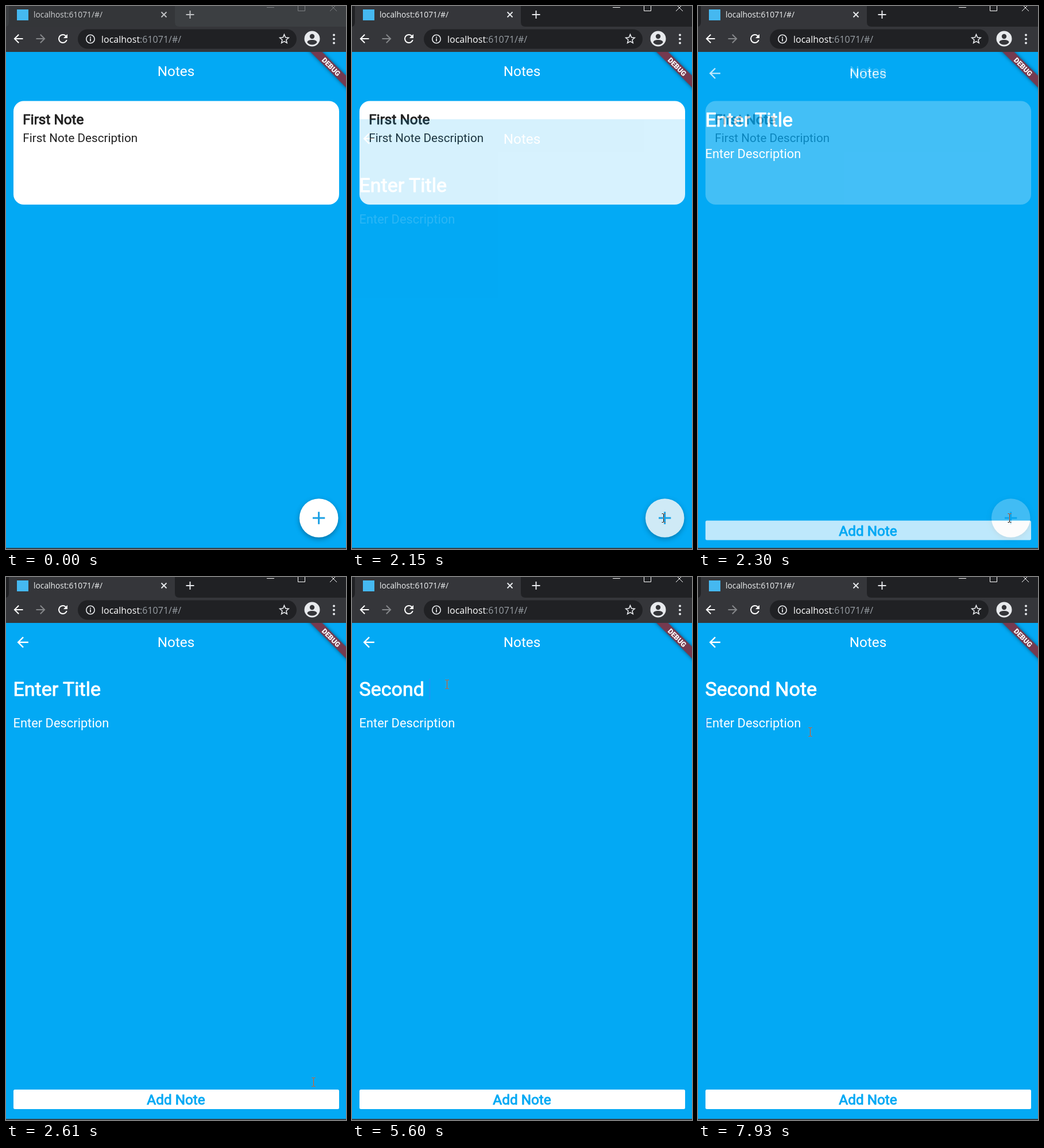
An HTML page for the animation above (8 s loop, 592 by 946 pixels).

```html
<!DOCTYPE html>
<html lang="en">
<head>
<meta charset="utf-8">
<title>Notes</title>
<style>
  html, body { margin: 0; width: 100%; height: 100%; overflow: hidden; background: #03a9f4; }
  svg { display: block; width: 100vw; height: 100vh; }
  text { font-family: Roboto, sans-serif; white-space: pre; }
  .chrome text { font-family: "Open Sans", sans-serif; }
  .line { fill: none; stroke: currentColor; }
  .heavy { stroke-width: .95px; stroke-linejoin: round; }
  .white { fill: #fff; stroke: #fff; }
  .bar { color: #c0c2c4; --frame: #3c3f42; --tab: #343639; --label: #cfd1d3; --button: #7d8083; }
  .bar.active { color: #e8eaed; --frame: #202124; --tab: #35363a; --label: #f1f3f4; --button: #fff; }
  .fab { filter: drop-shadow(0 3px 4px rgba(0, 0, 0, .32)); }
  .ribbon { filter: drop-shadow(0 0 3px rgba(0, 0, 0, .5)); }
  #beam { mix-blend-mode: difference; }
</style>
</head>
<body>
<svg viewBox="0 0 592 946">
  <defs>
    <clipPath id="view"><path d="M0 80H592V944H0z"/></clipPath>
    <path id="back" d="M20 11H7.83l5.59-5.59L12 4l-8 8 8 8 1.41-1.41L7.83 13H20z"/>
  </defs>

  <g class="chrome">
    <g id="bar" class="bar">
      <path fill="var(--frame)" d="M0 0H592V36H0z"/>
      <path fill="var(--tab)" d="M0 36Q5 35 5 28V0H294V28Q294 36 302 36z"/>
      <path fill="#45b8f0" d="M19 6H39V25H19z"/>
      <text x="48" y="20" font-size="13.8" fill="var(--label)">localhost:61071/#/</text>
      <path class="line" stroke-width="1.9" d="M270.500 10.500l9 9m0-9l-9 9M313.500 15h14m-7-7v14"/>
      <path fill="none" stroke="var(--button)" d="M454 2.500h13M508.500-3.500h12v12h-12zM564 9l12-12m-12 0l12 12"/>
    </g>
    <path fill="#35363a" d="M0 36H592V80H0z"/>
    <rect x="125" y="40.500" width="381" height="34" rx="17" fill="#202124"/>
    <use href="#back" x="9.500" y="45" fill="#fff"/>
    <use href="#back" transform="translate(72.500 69) rotate(180)" fill="#85878a"/>
    <path fill="#fff" transform="translate(87 45)" d="M17.650 6.350A8 8 0 0 0 12 4a8 8 0 1 0 7.730 10h-2.080A6 6 0 1 1 12 6c1.660 0 3.140.690 4.220 1.780L13 11h7V4z"/>
    <g color="#e8eaed">
      <circle class="line" cx="147" cy="57.500" r="7.200" stroke-width="1.600"/>
      <path class="line" stroke-width="1.800" d="M147 56.500v5m0-8v2"/>
      <path class="line" stroke-width="1.800" transform="translate(474 47) scale(.87)" d="M12 3l2.500 6 6.400.600-4.900 4.200 1.500 6.300L12 16.800l-5.500 3.300L8 13.800 3.100 9.600 9.500 9z"/>
      <circle cx="533" cy="57" r="13.500" fill="currentColor"/>
      <circle cx="533" cy="53" r="4.200" fill="#35363a"/>
      <path fill="#35363a" d="M524.500 63.500q0-4.500 8.500-4.500t8.500 4.500q-3 4-8.500 4t-8.500-4z"/>
      <path fill="none" stroke="currentColor" stroke-width="4" stroke-linecap="round" d="M571 50.500h0M571 57.500h0M571 64.500h0"/>
    </g>
    <text x="166" y="63.500" font-size="16" fill="#fff">localhost<tspan fill="#9aa0a6">:61071/#/</tspan></text>
  </g>

  <g clip-path="url(#view)">
    <path fill="#03a9f4" d="M0 80H592V944H0z"/>
    <g id="list">
      <text x="296" y="122.300" font-size="24.300" text-anchor="middle" fill="#fff">Notes</text>
      <rect x="13" y="165.500" width="567" height="180.500" rx="18" fill="#fff"/>
      <g fill="#212121">
        <text class="heavy" x="29.300" y="206" font-size="24.300" stroke="#212121">First Note</text>
        <text x="29.300" y="237" font-size="20.650">First Note Description</text>
      </g>
      <circle id="fab" class="fab" cx="544.700" cy="892" r="33.800" fill="#fff"/>
      <path stroke="#1aa0e4" stroke-width="3" d="M534 892h21.300M544.650 881.350v21.300"/>
    </g>
    <g id="editor">
      <path fill="#03a9f4" d="M0 80H592V944H0z"/>
      <use href="#back" transform="translate(14.600 99.200) scale(1.215)" fill="#fff"/>
      <text x="296" y="122.300" font-size="24.300" text-anchor="middle" fill="#fff">Notes</text>
      <text id="title" class="heavy white" x="12.500" y="206.500" font-size="34"></text>
      <rect id="titleCaret" y="177" width="2" height="37" fill="#2196f3"/>
      <text x="12.500" y="261.500" font-size="21.870" fill="#fff">Enter Description</text>
      <rect id="bodyCaret" x="13" y="242" width="2" height="25" fill="#2196f3"/>
      <rect x="13" y="893" width="567" height="34" rx="2.500" fill="#fff"/>
      <text class="heavy" x="296" y="919" font-size="24.300" text-anchor="middle" fill="#03a9f4" stroke="#03a9f4">Add Note</text>
    </g>
    <g transform="translate(592 80) rotate(45)">
      <path class="ribbon" fill="#753a4f" d="M-60 29.200H60V43.800H-60z"/>
      <text y="41" font-size="12.400" font-weight="900" text-anchor="middle" fill="#fff">DEBUG</text>
    </g>
  </g>
  <path fill="#33434c" d="M0 944H592V946H0z"/>

  <g id="arrow"><path fill="#fff" stroke="#000" d="M0 0V16l4-4 3 6 2-1-3-6h5z"/></g>
  <g id="hand"><path fill="#fff" stroke="#111" d="M-2 2q2-3 4 0v5q3-1 3.500 1 3-1 3.500 1 2 0 2 2v5l-2 4v2.500h-9V20l-5-7q-.500-3 3-1z"/><path stroke="#111" d="M2 7v4M5.500 8v3M9 9v3"/></g>
  <g id="beam"><path fill="none" stroke="#fff" d="M-3-7.500h2.500m1 0h2.500M0-7V7M-3 7.500h2.500m1 0h2.500" transform="translate(.5 0)"/></g>
</svg>
<script>
const LOOP = 8000, ROUTE_START = 2050, ROUTE_TIME = 300, RISE = 216;
const $ = id => document.getElementById(id);
const show = (id, on) => $(id).setAttribute('visibility', on ? 'visible' : 'hidden');
const latest = (steps, t) => steps.filter(step => step[0] <= t).pop();

const routeTicks = [[2000], [2070], [2150], [2230], [2300], [2380]];
const pointer = [
  [0, 'none', 0, 0],
  [360, 'arrow', 583, 938], [440, 'arrow', 574, 932], [520, 'arrow', 567, 930],
  [760, 'arrow', 560, 912], [840, 'hand', 552, 890], [910, 'hand', 545, 877],
  [990, 'hand', 541, 871], [1060, 'hand', 541, 870], [1210, 'hand', 541, 880],
  [1290, 'hand', 541, 892],
  [2150, 'beam', 542, 892], [2540, 'beam', 535, 880], [2620, 'beam', 520, 851],
  [2700, 'beam', 226, 333], [2780, 'beam', 164, 192], [2930, 'beam', 161, 180],
  [3010, 'beam', 159, 170], [3160, 'beam', 164, 178], [3240, 'beam', 173, 184],
  [3320, 'beam', 165, 187],
  [7390, 'beam', 168, 195], [7470, 'beam', 178, 225], [7540, 'beam', 190, 262],
  [7620, 'beam', 198, 283], [7700, 'beam', 197, 279], [7780, 'beam', 195, 272],
  [7850, 'beam', 195, 270]
];
const typed = 'Second Note';
const keyTimes = [4490, 4650, 4970, 5280, 5360, 5430, 5600, 6130, 6290, 6610, 6670];

function bezier(x1, y1, x2, y2, x) {
  const at = (a, b, s) => 3 * a * s * (1 - s) ** 2 + 3 * b * s * s * (1 - s) + s ** 3;
  let low = 0, high = 1;
  for (let i = 0; i < 24; i++) {
    const mid = (low + high) / 2;
    if (at(x1, x2, mid) < x) low = mid; else high = mid;
  }
  return at(y1, y2, low);
}

function drawRoute(t) {
  const tick = latest(routeTicks, t);
  const p = Math.min(1, Math.max(0, ((tick ? tick[0] : 0) - ROUTE_START) / ROUTE_TIME));
  const drop = p < 1 ? RISE * (1 - bezier(.4, 0, .2, 1, p)) : 0;
  $('editor').setAttribute('transform', `translate(0 ${drop})`);
  $('editor').setAttribute('opacity', p < 1 ? bezier(.42, 0, 1, 1, p) : 1);
  show('editor', p > 0);
  show('list', p < 1);
}

function drawFields(t) {
  const value = typed.slice(0, keyTimes.filter(k => k <= t).length);
  const title = $('title');
  title.textContent = value || 'Enter Title';
  $('titleCaret').setAttribute('x', value ? 12.5 + title.getComputedTextLength() : 14);
  show('titleCaret', (t >= 3400 && t < 3860) || (t >= 4410 && t < 7220));
  show('bodyCaret', t >= 7930);
}

function drawPointer(t) {
  const [, kind, x, y] = latest(pointer, t);
  for (const id of ['arrow', 'hand', 'beam']) show(id, id === kind);
  if (kind !== 'none') $(kind).setAttribute('transform', `translate(${x} ${y})`);
}

function render(t) {
  $('bar').classList.toggle('active', t >= 2000);
  $('fab').setAttribute('fill', t < 760 ? '#fff' : '#f5f5f5');
  drawRoute(t);
  drawFields(t);
  drawPointer(t);
}

const start = performance.now();
function frame(now) {
  render(Math.max(0, now - start) % LOOP);
  requestAnimationFrame(frame);
}
render(0);
requestAnimationFrame(frame);
</script>
</body>
</html>
```
